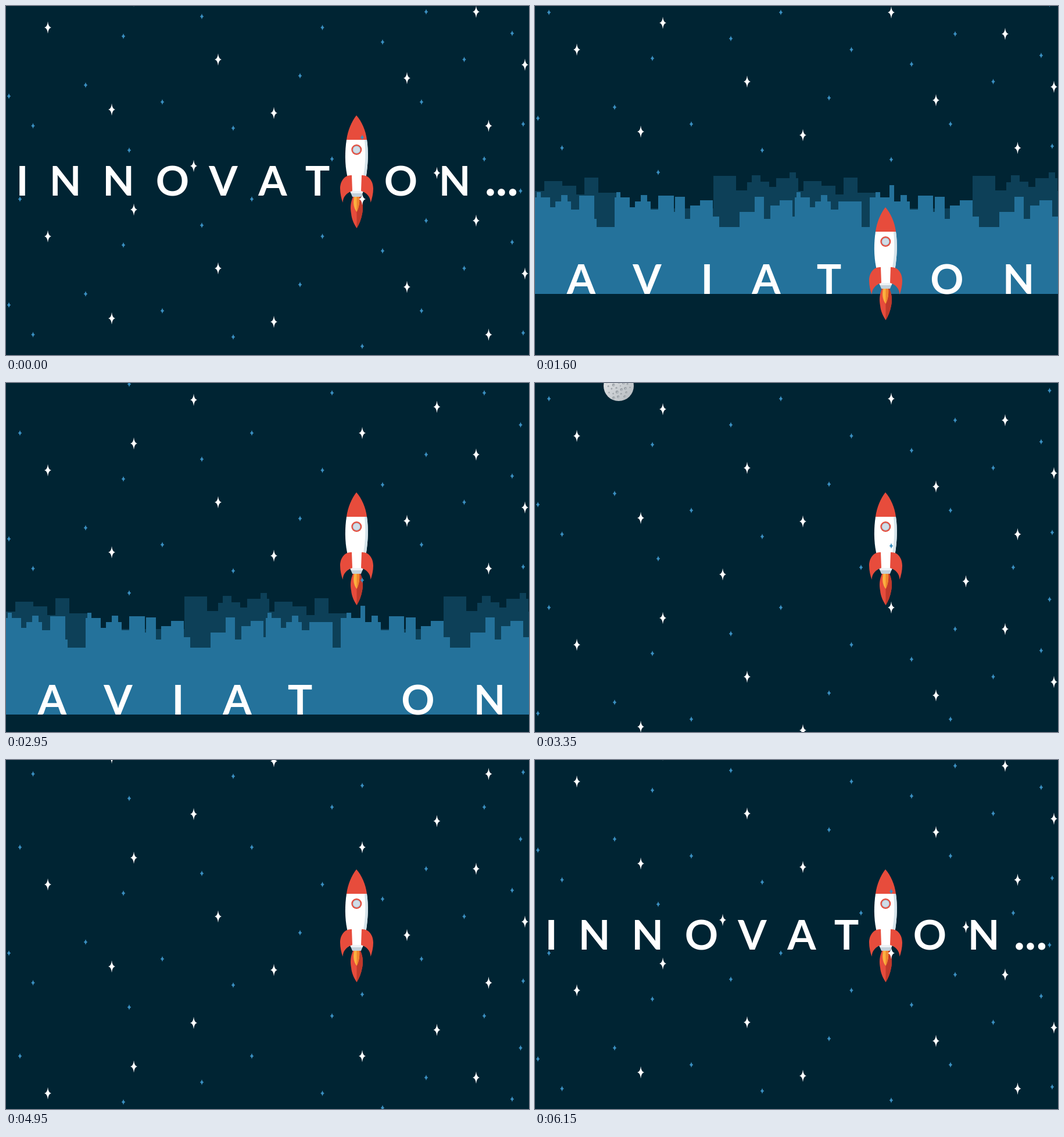
An HTML page with a canvas that plays this animation: 900x600 px, repeating every 9.15 s.

```html
<!DOCTYPE html>
<html lang="en">
<head>
<meta charset="utf-8">
<title>Rocket launch</title>
<style>
  html, body { margin: 0; width: 100%; height: 100%; overflow: hidden; background: #002433; }
  canvas { display: block; width: 900px; height: 600px; }
</style>
</head>
<body>
<canvas id="stage" width="900" height="600"></canvas>
<script>
const W = 900, H = 600, LOOP = 9150;
const NIGHT = '#002433', NEAR = '#24729b', FAR = '#0d4058';
const RED = '#e74c3c', DARK_RED = '#c0392b', AMBER = '#fbb040';
const SPEED = 75, LAST = 33, TILE = 359, LIFT = 158;
const ctx = document.getElementById('stage').getContext('2d');

const BIG = [72,75, 182,216, 365,130, 461,222, 690,162, 809,48, 830.5,244, 893,139,
  220,29, 613,11, 323,313, 741.5,325];
const SMALL = [202,90, 137,174, 269,203, 5,193, 46.5,244, 212,286, 24,11, 391,248,
  423,11, 337,56, 506,158, 544.5,75, 648,100, 723,48, 788.5,130, 715,203, 871,85,
  890,241, 613,264, 561,301, 823,301, 885.5,356];

// Skylines: pairs of left edge and roof height.
const shift = (list, dx) => list.map((v, i) => i % 2 ? v : v + dx);
const HOUSES = [0,329, 3,320, 10,329, 26,346, 35,336, 45,325, 56,336, 62,350];
const TOWERS = [0,328, 17,366, 26,343, 43,334, 65,362, 76,380, 111,354, 137,328,
  153,366, 164,343, 180,334, 202,362];
const BLOCKS = [0,301, 31,309, 55,324, 69,295, 93,321, 124,348, 291,292, 330,317,
  349,303, 357,291, 372,302, 387,311, 399,296, 422,286, 433,296, 437,318];
const nearCity = [...HOUSES, 76,326, 102,366, 106,380, ...shift(HOUSES, 137), 212,326, 239,354,
  ...shift(TOWERS, 241), ...shift(HOUSES, 447), 522,336, 562,380, 576,329, 586,320, 594,329,
  610,308, 618,336, 629,325, 640,336, 645,350, 659,326, 685,354, ...shift(TOWERS, 688)];
const farCity = [0,318, ...shift(BLOCKS, 16), ...shift(BLOCKS, 462)];

const AVIATION = [['A',79.5], ['V',193], ['I',296], ['A',398], ['T',506], ['O',709], ['N',832]];
const INNOVATION = [['I',28], ['N',102], ['N',193.5], ['O',286.5], ['V',374], ['A',459],
  ['T',536], ['O',679.5], ['N',772]];
const DOTS = [['.',833.5], ['.',852.5], ['.',872]];

function randomizer(seed) {
  return () => (seed = (seed * 16807) % 2147483647) / 2147483647;
}

function layer(w, h, paint) {
  const c = document.createElement('canvas');
  c.width = w;
  c.height = h;
  paint(c.getContext('2d'));
  return c;
}

function disc(g, x, y, r, color) {
  g.fillStyle = color;
  g.beginPath();
  g.arc(x, y, r, 0, Math.PI * 2);
  g.fill();
}

function shape(path, color) {
  ctx.fillStyle = color;
  ctx.fill(path);
}

function star(x, y, w, h, color) {
  const k = 0.9;
  ctx.fillStyle = color;
  ctx.beginPath();
  ctx.moveTo(x, y - h);
  ctx.quadraticCurveTo(x + k, y - k, x + w, y);
  ctx.quadraticCurveTo(x + k, y + k, x, y + h);
  ctx.quadraticCurveTo(x - k, y + k, x - w, y);
  ctx.quadraticCurveTo(x - k, y - k, x, y - h);
  ctx.fill();
}

function stars(list, off, w, h, core, color) {
  for (let i = 0; i < list.length; i += 2) {
    // The field starts just above the roofs and repeats upwards.
    let base = list[i + 1];
    if (base > 290) base -= TILE;
    for (let y = base + off; y > -15; y -= TILE) {
      if (y > H + 15) continue;
      star(list[i], y, w, h, color);
      disc(ctx, list[i], y, core, color);
    }
  }
}

function skyline(list, color) {
  ctx.fillStyle = color;
  ctx.beginPath();
  ctx.moveTo(0, 495);
  for (let i = 0; i < list.length; i += 2) {
    ctx.lineTo(list[i], list[i + 1]);
    ctx.lineTo(i + 2 < list.length ? list[i + 2] : W, list[i + 1]);
  }
  ctx.lineTo(W, 495);
  ctx.fill();
}

function letters(list, y, weight = 700) {
  ctx.font = weight + ' 71px Lato, "Open Sans", sans-serif';
  ctx.textAlign = 'center';
  ctx.fillStyle = '#fff';
  for (const [ch, x] of list) ctx.fillText(ch, x, y);
}

const nose = new Path2D('M603 188C612 198 619 214 621 230H586C588 214 595 198 603 188Z');
const hull = new Path2D('M586 230H621C624 250 623 272 620 291L613 320H594L587 291C583 272 583 250 586 230Z');
const shade = new Path2D('M617 230H621C624 250 623 272 620 291H615C619 270 619 250 617 230Z');
const nozzle = new Path2D('M592 318H615L611 328H596Z');
const nozzleTop = new Path2D('M592 318H615L613.5 322H593.5Z');
const finL = new Path2D('M595 291C582 290 575 302 575 314C575 322 577 331 579.5 338C580 328 586 321 596 318Z');
const finR = new Path2D('M612 291C625 290 632 302 632 314C632 322 630 331 627.5 338C627 328 621 321 611 318Z');
const flame = new Path2D('M597 328H610C614 338 615 346 613 357C611 367 608 375 603.5 382C599 375 595 367 594 357C592 346 593 338 597 328Z');
const flameDark = new Path2D('M603.5 328H610C614 338 615 346 613 357C611 367 608 375 603.5 382Z');
const spark = new Path2D('M599 328H608C609 338 607 347 603.5 354C598 347 597 338 599 328Z');
const sparkDark = new Path2D('M603.5 328H608C609 338 607 347 603.5 354Z');

function rocket(dy, lit) {
  ctx.save();
  ctx.translate(0, dy);
  if (lit) {
    shape(flame, RED);
    shape(flameDark, DARK_RED);
    shape(spark, AMBER);
    shape(sparkDark, '#f0862c');
  }
  shape(hull, '#fff');
  shape(shade, '#d5e3ea');
  shape(nose, RED);
  shape(nozzle, '#c3d1da');
  shape(nozzleTop, '#eef3f6');
  shape(finL, RED);
  shape(finR, RED);
  disc(ctx, 603.3, 247, 9, RED);
  disc(ctx, 603.3, 247, 6.8, '#a9b8c4');
  disc(ctx, 603.3, 247, 5.8, '#cfdde8');
  ctx.restore();
}

const smoke = layer(W, H, g => {
  const puffs = [[487,580,45], [532,548,24], [570,526,21], [540,585,42], [600,570,42],
    [645,559,32], [667,531,25], [683,553,19], [692,600,41]];
  for (const p of puffs) disc(g, ...p, '#fff');
  g.fillRect(460, 570, 250, 30);
  g.fill(new Path2D('M592 485H615C616 505 620 522 626 540H582C588 522 591 505 592 485Z'));
  g.strokeStyle = '#e6eef3';
  g.lineWidth = 5;
  for (const [x, y, r, a, b] of [[508,598,43,3.2,5.2], [610,582,43,2.6,4.3],
    [627,551,24,-0.4,2.1], [692,600,37,4.8,6.3], [667,531,21,-0.4,1.2]]) {
    g.beginPath();
    g.arc(x, y, r, a, b);
    g.stroke();
  }
});

const moon = layer(60, 60, g => {
  const rnd = randomizer(41);
  const light = g.createLinearGradient(6, 6, 54, 54);
  light.addColorStop(0, '#e6e8ea');
  light.addColorStop(1, '#b4babf');
  disc(g, 30, 30, 26, light);
  for (let i = 0; i < 28; i++) {
    const a = i * 2.4, d = 22.5 * Math.sqrt((i + 0.5) / 28), r = 0.9 + rnd() * 1.7;
    const x = 30 + d * Math.cos(a), y = 30 + d * Math.sin(a);
    disc(g, x, y, r, '#92999f');
    disc(g, x + 0.5, y + 0.5, r * 0.6, '#b9bec3');
  }
});

const galaxy = layer(70, 70, g => {
  const rnd = randomizer(97);
  const tones = ['#2f7dad', '#4c9ccb', '#8cc8e8', '#d8eef8'];
  for (let i = 0; i < 300; i++) {
    const d = 4 + 29 * rnd();
    const a = (i % 5) * Math.PI * 0.4 + d * 0.075 + (rnd() - 0.5) * 0.38;
    const tone = tones[Math.floor(rnd() * (d < 18 ? 4 : 3))];
    disc(g, 35 + d * Math.cos(a), 35 + d * Math.sin(a), 0.4 + rnd() * 0.8, tone);
  }
  for (let i = 0; i < 60; i++) {
    const d = 10 * rnd(), a = rnd() * 6.283;
    disc(g, 35 + d * Math.cos(a), 35 + d * Math.sin(a), 0.5 + rnd(), d < 6 ? '#fff' : '#8cc8e8');
  }
  disc(g, 35, 35, 2.6, '#fff');
});

function draw(time) {
  const t = time < 100 ? LOOP : time;
  const step = Math.max(0, Math.floor((t - 1950) / 100) + 1);
  const rise = Math.min(1, Math.max(0, (step - 5) / 5));
  const off = SPEED * Math.min(LAST, Math.max(0, step - 10));

  ctx.fillStyle = NIGHT;
  ctx.fillRect(0, 0, W, H);

  if (off < 330) {
    ctx.save();
    ctx.translate(0, off);
    skyline(farCity, FAR);
    skyline(nearCity, NEAR);
    letters(AVIATION, 495);
    ctx.restore();
  }
  ctx.drawImage(moon, 114, 575 + off - 13 * SPEED);
  ctx.drawImage(galaxy, 245, 383 + off - 28 * SPEED);

  const line = 326 + off - LAST * SPEED;
  if (line > -20) {
    letters(INNOVATION, line);
    letters(DOTS, line, 900);
  }

  rocket(LIFT * (1 - rise), t >= 1600);
  if (step > 0 && step < 10) {
    ctx.globalAlpha = Math.min(step / 5, 1 - rise);
    ctx.drawImage(smoke, 0, 0);
    ctx.globalAlpha = 1;
  }
  stars(SMALL, off, 3.4, 5, 0.9, '#3a8fc0');
  stars(BIG, off, 6, 10.5, 2.1, '#fff');
}

function tick() {
  draw(performance.now() % LOOP);
  requestAnimationFrame(tick);
}
tick();
</script>
</body>
</html>
```
